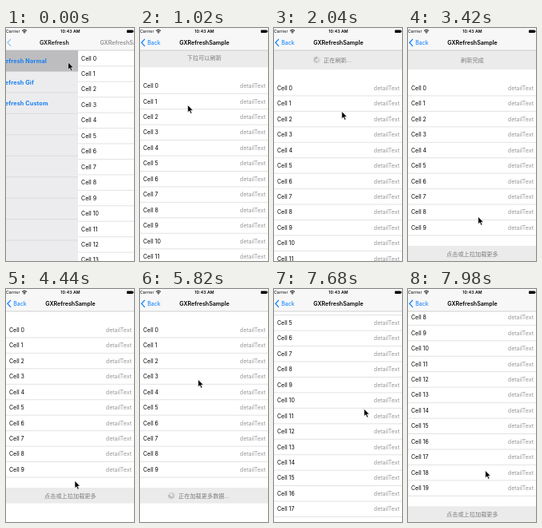
Animation, 160 px wide and 292 px high, one loop 8 s. Source, as an HTML page:

```html
<!DOCTYPE html>
<html lang="zh">
<head>
<meta charset="utf-8">
<title>GXRefresh</title>
<style>
html, body { margin: 0; width: 100%; height: 100%; overflow: hidden; background: #fff; }
svg { display: block; width: 100vw; height: 100vh; }
text { font: 7px Inter, "Noto Sans CJK SC", "Noto Sans CJK", sans-serif; }
.cjk { font: 7.2px "Noto Sans CJK SC", "Noto Sans CJK", sans-serif; fill: #7c7c7c; }
.title { font-size: 7.1px; font-weight: 600; text-anchor: middle; }
.menu { font-size: 7.2px; font-weight: 700; letter-spacing: .16px; fill: #147ef2; }
.status { font-size: 5.2px; letter-spacing: .06px; }
.detail { fill: #959599; text-anchor: end; }
.line { stroke: #cfcfd2; stroke-width: .6; }
</style>
</head>
<body>
<svg viewBox="0 0 160 292">
  <g id="menu"></g>
  <g id="page">
    <rect y="28" width="160" height="264" fill="#fff"/>
    <g id="table">
      <g id="header">
        <rect y="-24" width="160" height="24" fill="#ebebeb"/>
        <text id="headText" class="cjk" y="-9.4"/>
        <g id="headSpin"></g>
      </g>
      <g id="cells"></g>
      <g id="footer">
        <rect width="160" height="19.6" fill="#ebebeb"/>
        <text id="footText" class="cjk" y="12.5"/>
        <g id="footSpin"></g>
      </g>
    </g>
  </g>
  <rect width="160" height="28" fill="#f7f7f7"/>
  <path d="M0 28H160" stroke="#b4b4b6" stroke-width=".6"/>
  <text class="status" x="0" y="6.4">Carrier</text>
  <g fill="none" stroke="#000">
    <path d="M20 3.4Q23 .9 26 3.4M21.3 4.9Q23 3.4 24.7 4.9"/>
    <circle cx="23" cy="6" r=".3"/>
  </g>
  <text class="status" x="80.5" y="6.4" text-anchor="middle" font-weight="600" style="font-weight:600">10:43 AM</text>
  <rect x="151" y="2.4" width="7.8" height="3.6" rx=".8"/>
  <rect x="159" y="3.5" width=".6" height="1.4"/>
  <path id="chevron" d="M6 13.8L1.9 18.3L6 22.8" fill="none" stroke="#007aff" stroke-width="1.2"/>
  <text id="back" x="9.2" y="20.8" fill="#007aff">Back</text>
  <text id="oldTitle" class="title" y="20.8">GXRefresh</text>
  <text id="newTitle" class="title" y="20.8">GXRefreshSample</text>
  <path id="cursor" d="M0 0V9.2L2.1 7.3L3.6 10.8L5.2 10.1L3.7 6.7H6.6Z" stroke="#fff" stroke-width=".6"/>
</svg>
<script>
const LOOP = 8000, ROW = 19.45, GAP = 13.5, MENU_ROW = 26.45;
const $ = id => document.getElementById(id);
const set = (id, name, value) => $(id).setAttribute(name, value);
const move = (id, x, y) => set(id, 'transform', `translate(${x} ${y})`);
const show = (el, on) => { el.style.display = on ? '' : 'none'; };
const arc = u => Math.sin(Math.PI * u);

// Smooth progress from 0 to 1 between two times.
function ramp(t, from, to) {
  const u = Math.min(1, Math.max(0, (t - from) / (to - from)));
  return u * u * (3 - 2 * u);
}

// The gestures drive both the table and the pointer.
function gestures(t) {
  const grab = ramp(t, 480, 720);
  const pull = ramp(t, 890, 1020);
  const stretch = ramp(t, 1020, 1300);
  const release = ramp(t, 1380, 1640);
  const rest = ramp(t, 1500, 2040);
  const descend = ramp(t, 2640, 3400);
  const close = ramp(t, 3880, 4150);
  const tap = ramp(t, 4300, 4740);
  const leave = ramp(t, 4940, 5820);
  const drift = ramp(t, 5820, 6300);
  const reach = ramp(t, 6580, 7020);
  const drag = ramp(t, 7020, 7380);
  const fling = ramp(t, 7420, 7930);
  return {
    scroll: -13.2 + 23.2 * grab + 11.3 * pull + 12 * stretch - 9.3 * release
      - 24 * close - 36.2 * drag - 135 * fling,
    x: 77.7 - 18 * grab + 25 * rest + 3 * descend - 7 * tap - 8 * leave
      + 45 * arc(leave) + 4 * drift + 53 * reach - 33 * fling,
    y: 43 + 43.5 * grab + 10 * pull + 18 * stretch - 10 * rest + 132 * descend
      + 16 * tap - 139 * leave - 25 * drift + 140 * reach - 37 * drag
      + 36 * fling - 60 * arc(fling)
  };
}

function build() {
  let menu = '<rect y="28" width="160" height="264" fill="#ececee"/>' +
    '<rect y="28" width="160" height="26.5" fill="#bdbdbf"/>';
  for (let i = 1; i < 11; i++) {
    menu += `<path class="line" d="M0 ${28 + i * MENU_ROW}H160"/>`;
  }
  ['Normal', 'Gif', 'Custom'].forEach((name, i) => {
    menu += `<text class="menu" x="15" y="${44.3 + i * MENU_ROW}">Refresh ${name}</text>`;
  });
  $('menu').innerHTML = menu;

  let cells = '';
  for (let i = 0; i < 20; i++) {
    const y = GAP + i * ROW;
    cells += `<g><text x="4" y="${y + 12.3}">Cell ${i}</text>` +
      `<text class="detail" x="157" y="${y + 12.3}">detailText</text>` +
      `<path class="line" d="M0 ${y + ROW}H160"/></g>`;
  }
  $('cells').innerHTML = cells;

  const spokes = Array.from({ length: 12 }, (_, i) =>
    `<path d="M0 -2V-4" stroke="#888" stroke-width=".8" stroke-linecap="round" transform="rotate(${i * 30})"/>`).join('');
  $('headSpin').innerHTML = $('footSpin').innerHTML = spokes;
  move('headSpin', 53.5, -12);
  move('footSpin', 39.3, 9.8);
}

function label(id, text, x) {
  $(id).textContent = text;
  set(id, 'x', x);
}

function spin(id, t, on) {
  const step = Math.floor(t / 1000 * 12);
  show($(id), on);
  [...$(id).children].forEach((spoke, i) => {
    spoke.style.opacity = 1 - ((step - i) % 12 + 12) % 12 * .07;
  });
}

function drawPush(t) {
  const left = t < 600 ? .57 * Math.exp(-t / 95) * (1 - t / 600) : 0;
  const done = 1 - left;
  move('menu', -48 * done, 0);
  move('page', 160 * left, 0);
  set('oldTitle', 'x', 80 - 45 * done);
  set('oldTitle', 'opacity', Math.max(0, 1 - done ** 3 * 1.1));
  set('newTitle', 'x', 80.5 + 121 * left);
  set('newTitle', 'opacity', done ** 1.1);
  set('chevron', 'opacity', done);
  set('back', 'opacity', Math.max(0, 1 - left * 3));
}

function draw(t) {
  const { scroll, x, y } = gestures(t);
  const refreshing = t >= 1380 && t < 3360;
  const loading = t >= 4900 && t < 6590;
  const rows = t >= 3360 && t < 6590 ? 10 : 20;

  drawPush(t);
  move('table', 0, 28 + scroll);
  [...$('cells').children].forEach((cell, i) => show(cell, i < rows));
  move('footer', 0, GAP * 2 + rows * ROW - .5);

  if (refreshing) label('headText', '正在刷新...', 62);
  else if (t >= 3360) label('headText', '刷新完成', 66);
  else label('headText', scroll > 24 ? '释放立即刷新' : '下拉可以刷新', 58.8);
  label('footText', loading ? '正在加载更多数据...' : '点击或上拉加载更多', 48);
  show($('header'), scroll > 0);
  spin('headSpin', t, refreshing);
  spin('footSpin', t, loading);
  move('cursor', x, y);
}

build();
const start = performance.now();
function frame() {
  draw((performance.now() - start) % LOOP);
  requestAnimationFrame(frame);
}
frame();
</script>
</body>
</html>
```
